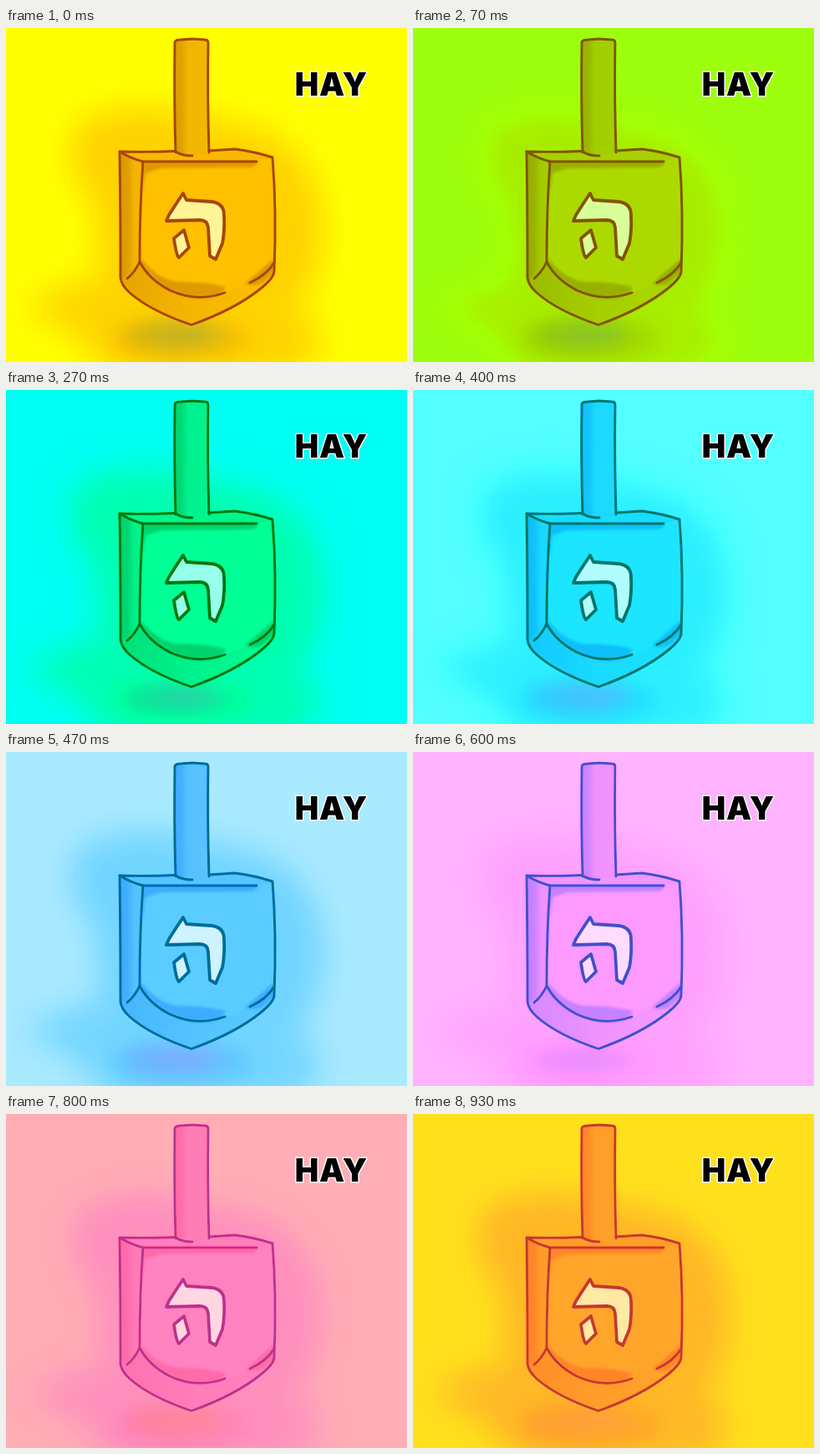
An HTML page that plays this animation: 480 by 400 pixels, repeating every 990 ms.

```html
<!DOCTYPE html>
<html lang="en">
<head>
<meta charset="utf-8">
<title>Dreidel</title>
<style>
  html, body { margin: 0; width: 100%; height: 100%; overflow: hidden; background: #ff0; }
  svg { position: absolute; left: 0; top: 0; width: 480px; height: 400px; display: block; }
  .ink { fill: none; stroke: #a8450a; stroke-width: 2.9; stroke-linecap: round; stroke-linejoin: round; }
  .word { font: 900 38px Inter, sans-serif; letter-spacing: .8px; text-anchor: middle; stroke: #fff; stroke-width: 3; stroke-linejoin: round; paint-order: stroke; }
</style>
</head>
<body>
<svg id="art" viewBox="0 0 480 400">
  <defs>
    <filter id="haze" x="-40%" y="-40%" width="180%" height="180%" color-interpolation-filters="sRGB">
      <feGaussianBlur stdDeviation="19"/>
    </filter>
    <filter id="soft" x="-40%" y="-80%" width="180%" height="260%" color-interpolation-filters="sRGB">
      <feGaussianBlur stdDeviation="11"/>
    </filter>
    <filter id="brush" x="-30%" y="-30%" width="160%" height="160%" color-interpolation-filters="sRGB">
      <feGaussianBlur stdDeviation="1.5"/>
    </filter>
    <linearGradient id="wood">
      <stop offset="0" stop-color="#dc9c00"/>
      <stop offset=".2" stop-color="#e0a200"/>
      <stop offset=".4" stop-color="#f0b600"/>
      <stop offset="1" stop-color="#f2b800"/>
    </linearGradient>
    <linearGradient id="side">
      <stop offset="0" stop-color="#d89600"/>
      <stop offset=".35" stop-color="#e09e00"/>
      <stop offset=".65" stop-color="#f2b400"/>
      <stop offset="1" stop-color="#f4b600"/>
    </linearGradient>
    <linearGradient id="base">
      <stop offset="0" stop-color="#e6a400"/>
      <stop offset=".45" stop-color="#f4b600"/>
      <stop offset="1" stop-color="#fdbe00"/>
    </linearGradient>
    <clipPath id="within">
      <path d="M136 148L202 147L274 145L319 155Q324 220 321 292Q316 303 305 312Q270 337 222 356Q172 337 148 317Q137 307 137 300Z"/>
    </clipPath>
  </defs>

  <rect width="480" height="400" fill="#ff0"/>

  <g filter="url(#haze)">
    <path d="M86 116Q130 86 202 98L285 116Q352 130 374 196Q390 262 362 318L330 352L130 345Q104 270 108 212Q60 164 86 116Z" fill="#ffd000" opacity=".95"/>
    <path d="M18 338Q80 292 150 298L310 320Q380 345 380 378L345 420H125Q80 350 18 338Z" fill="#ffd400"/>
  </g>
  <g filter="url(#soft)">
    <ellipse cx="210" cy="372" rx="84" ry="28" fill="#f4b800" opacity=".75"/>
    <ellipse cx="196" cy="368" rx="54" ry="18" fill="#c4b01c" opacity=".7"/>
    <ellipse cx="222" cy="367" rx="44" ry="14" fill="#b0b43c" opacity=".45"/>
  </g>

  <g clip-path="url(#within)">
    <rect x="130" y="140" width="200" height="220" fill="#ffc000"/>
    <path d="M136 148L274 145L319 155L300 160H163Z" fill="#f8b800"/>
    <path d="M136 148L163 160L160 281L145 301L137 305Z" fill="url(#side)"/>
    <path d="M137 302L160 281Q176 308 205 319Q234 326 262 317L292 305L322 281V360H137Z" fill="url(#base)"/>
    <g filter="url(#brush)" fill="#de9a00">
      <path d="M163 160H301Q301 168 285 167L185 168L167 174L164 200Z"/>
      <path d="M162 276Q180 300 205 304Q235 303 263 310Q260 321 240 324Q196 326 162 284Z"/>
      <path d="M286 306Q304 290 322 275V292L306 306Q294 310 286 306Z"/>
    </g>
  </g>

  <path d="M202 17Q203 13 208 13H237Q242 13 242 18V149Q222 156 203 148Z" fill="url(#wood)"/>

  <g class="ink">
    <path d="M203 149Q201 84 202 17Q203 14 209 14L223 13L238 14Q242 14 242 18Q241 82 243 149"/>
    <path d="M203 148Q210 153 223 153"/>
    <path d="M202 147.5Q166 149 136 148Q137 220 137 299Q138 308 148 317Q173 339 222 355.5Q274 337 305 312Q320 300 321 292Q324 218 319 155Q298 148 274 145L243 147"/>
    <path d="M136 148Q149 156 164 160H300"/>
    <path d="M164 160Q160 216 160 280Q154 293 145 300"/>
    <path d="M160 280Q171 301 196 314Q228 329 262 317"/>
    <path d="M292 305Q312 296 321 281"/>
  </g>

  <g class="ink" style="fill:#fff596;stroke-width:3.8">
    <path d="M212 198L216 206L246 208Q261 210 261 224Q262 243 259 258L251 277L244 273L242 239Q241 230 232 230L192 231L195 224L204 210Z"/>
    <path d="M213 242L219 263L207 275Q204 273 201 252Z"/>
  </g>

  <text class="word" x="389.4" y="80.5">HAY</text>
</svg>
<script>
  const art = document.getElementById("art");
  const LOOP = 990, STEPS = 15;
  const stepStart = i => Math.round(i * 20 / 3) * 10;
  let shown = -1;

  function draw(time) {
    const t = time % LOOP;
    let step = STEPS - 1;
    while (stepStart(step) > t) step--;
    if (step === shown) return;
    shown = step;
    art.style.filter = `hue-rotate(${step * 360 / STEPS}deg)`;
  }

  const begin = performance.now();
  function tick() {
    draw(performance.now() - begin);
    requestAnimationFrame(tick);
  }
  tick();
</script>
</body>
</html>
```
